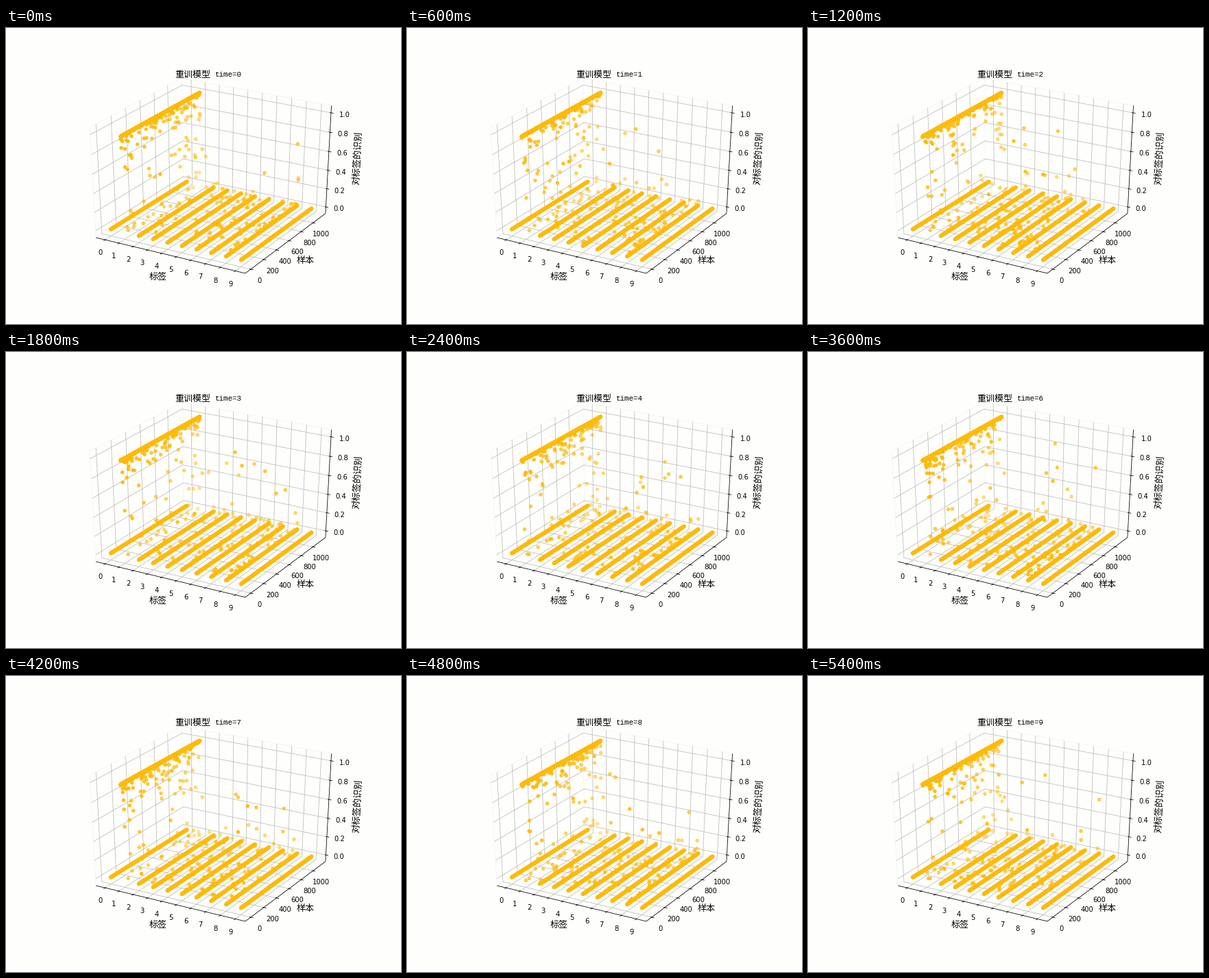
A matplotlib script that plays this animation: 576 by 432 pixels, repeating every 6000 ms.

```python
import numpy as np
import matplotlib.pyplot as plt
from matplotlib.animation import FuncAnimation
from matplotlib.collections import LineCollection

W, H = 576, 432
STEPS, INTERVAL = 10, 600
SAMPLES = 1135
PAPER, GRID, PANE, GOLD = "#fefefc", "#bcbcb8", "#f6f6ea", (1.0, 0.73, 0.02)
CJK, MONO, SANS = "Noto Sans CJK JP", "Liberation Mono", "DejaVu Sans"

# Camera: elevation 30, azimuth -60, ten units from a unit cube.
EL, AZ, DIST = np.radians(30), np.radians(-60), 10
RIGHT = np.array([-np.sin(AZ), np.cos(AZ), 0])
UP = np.array([-np.cos(AZ) * np.sin(EL), -np.sin(AZ) * np.sin(EL), np.cos(EL)])
TOWARD = np.array([np.cos(AZ) * np.cos(EL), np.sin(AZ) * np.cos(EL), np.sin(EL)])
SCALE_X, SCALE_Y = 0.775 * W / 0.185, 0.755 * H / 0.185
MID_X = 0.125 * W + 0.095 * SCALE_X
MID_Y = 0.875 * H - 0.095 * SCALE_Y

E = 0.5 + 1 / 48             # pane position in cube units
DELTA = 1 / 12
PER_POINT = 48 / (0.775 * W + 0.755 * H) * DELTA
TOPS = (9, SAMPLES - 1, 1)
TICKS = (range(10), range(0, 1001, 200), np.arange(6) / 5)

# Label, sample and score of the samples that stay hard in every step.
STEADY = [(1, 1066, 0.53), (2, 953, 0.5), (1, 50, 0.0)]


def unit(value, axis):
    """Data value to cube coordinate, with a 5 % margin at both ends."""
    return (np.asarray(value) / TOPS[axis] + 0.05) / 1.1 - 0.5


def project(points):
    p = np.asarray(points, float)
    depth = DIST - p @ TOWARD
    x = MID_X + SCALE_X * (p @ RIGHT) / depth
    y = MID_Y - SCALE_Y * (p @ UP) / depth
    return np.stack([x, y], axis=-1), depth


def scores(step):
    """Columns of label, sample and score for one step."""
    rng = np.random.default_rng(40 + step)
    grid = np.zeros((10, SAMPLES))
    grid[1] = 1 - rng.exponential(0.003, SAMPLES)

    def lift(label, values):
        grid[label, rng.choice(SAMPLES, len(values), replace=False)] = values

    lift(1, 1 - np.minimum(rng.exponential(0.06, 75), 0.9))
    lift(1, 1 - 0.9 * rng.random(40) ** 1.4)
    lift(1, rng.exponential(0.05, 14))
    favourite = rng.integers(6, 9)
    for label in range(2, 9):
        count = 36 if label == favourite else 14
        lift(label, np.minimum(rng.exponential(0.06, count), 0.3))
    for label in rng.integers(2, 9, 13):
        lift(label, rng.uniform(0.15, 0.9, 1))
    for label, sample, score in STEADY:
        grid[label, sample] = score
    labels, samples = np.indices(grid.shape)
    return labels.ravel(), samples.ravel(), grid.ravel()


def cloud(step):
    """Screen places and depth-faded colours, farthest points first."""
    xy, depth = project(np.stack([unit(c, i) for i, c in enumerate(scores(step))], -1))
    far = -DIST / depth
    alpha = 1 - 0.7 * (far - far.min()) / np.ptp(far)
    order = np.argsort(-depth)
    colors = np.column_stack([np.tile(GOLD, (len(alpha), 1)), alpha])
    return xy[order], colors[order]


fig = plt.figure(figsize=(W / 72, H / 72), dpi=72, facecolor=PAPER)
ax = fig.add_axes([0, 0, 1, 1])
ax.set(xlim=(0, W), ylim=(H, 0))
ax.axis("off")


def draw_lines(paths, color, z):
    lines = [project(p)[0] for p in paths]
    ax.add_collection(LineCollection(lines, colors=color, linewidths=0.8, zorder=z))


def write(x, y, text, size=13, font=CJK, **kw):
    return ax.text(x, y, text, fontsize=size, family=font, **kw)


def with_axis(axis, value, base):
    point = np.array(base, float)
    point[axis] = value
    return point


draw_lines([[(-E, -E, -E), (-E, -E, E), (-E, E, E), (E, E, E)],
            [(-E, -E, -E), (-E, E, -E), (E, E, -E)],
            [(-E, E, -E), (-E, E, E)]], PANE, 1)

# Each axis: its grid path, the edge it runs along, tick direction, label, angle.
AXES = [
    ([(0, -E, -E), (0, E, -E), (0, E, E)], (0, -E, -E), 1, "标签", 0),
    ([(E, 0, -E), (-E, 0, -E), (-E, 0, E)], (E, 0, -E), 0, "样本", 0),
    ([(-E, -E, 0), (-E, E, 0), (E, E, 0)], (E, E, 0), 0, "对标签的识别", 87),
]
for axis, (path, edge, side, name, angle) in enumerate(AXES):
    edge = np.array(edge)
    out = np.sign(edge)
    tick_dir = with_axis(side, out[side], (0, 0, 0)) * DELTA
    grid, marks = [], []
    for tick in TICKS[axis]:
        pos = unit(tick, axis)
        grid.append([with_axis(axis, pos, p) for p in path])
        base = with_axis(axis, pos, edge)
        marks.append([base + 0.2 * tick_dir, base - 0.1 * tick_dir])
        (x, y), _ = project(base + out * 11.5 * PER_POINT)
        text = f"{tick:.1f}" if axis == 2 else str(tick)
        write(x, y, text, 10, SANS, ha="center", va="top")
    draw_lines(grid, GRID, 2)
    spine = [with_axis(axis, -E, edge), with_axis(axis, E, edge)]
    draw_lines([spine] + marks, "black", 3)
    (x, y), _ = project(edge + out * 25 * PER_POINT)
    turn = np.radians(angle)
    write(x + 1.5 * np.sin(turn), y + 1.5 * np.cos(turn), name, rotation=angle,
          ha="center", va="center", rotation_mode="anchor")

write(246, 71.5, "重训模型")
counter = write(304.5, 71, "", 10.83, MONO)
dots = ax.scatter([], [], s=20, linewidths=1, zorder=4)


def update(step):
    xy, colors = cloud(step)
    dots.set_offsets(xy)
    dots.set_facecolors(colors)
    dots.set_edgecolors(colors)
    counter.set_text(f"time={step}")
    return dots, counter


anim = FuncAnimation(fig, update, frames=STEPS, interval=INTERVAL,
                     repeat=True, repeat_delay=0)
plt.show()
```
